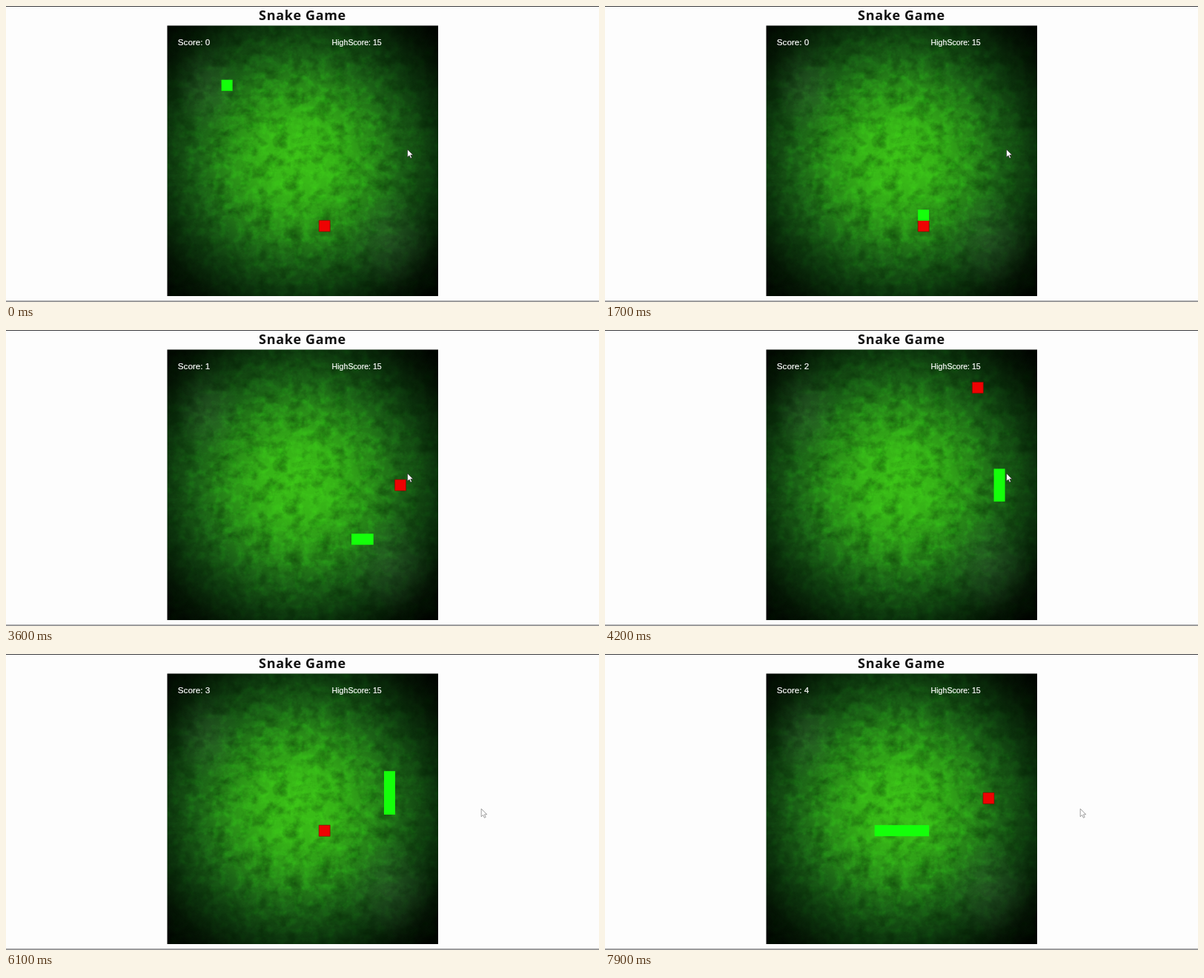
Write an HTML page that moves like this. It is 800 px wide and 400 px high and loops after 8 s.

```html
<!DOCTYPE html>
<html lang="en">
<head>
<meta charset="utf-8">
<title>Snake Game</title>
<style>
  html, body { margin: 0; width: 100%; height: 100%; overflow: hidden; background: #fdfdfd; }
  svg { position: absolute; left: 0; top: 0; width: 800px; height: 400px; }
  #play { will-change: transform; }
  h1 { position: absolute; left: 0; top: 0; width: 800px; margin: 0; text-align: center; color: #111;
       font: bold 18px/24px "Noto Sans", "Open Sans", sans-serif; letter-spacing: .65px; }
  text { font-family: "Liberation Sans", Arial, sans-serif; fill: #fff; stroke: #fff; stroke-width: .2; }
  .grain { mix-blend-mode: overlay; }
</style>
</head>
<body>
<svg viewBox="0 0 800 400">
  <defs>
    <radialGradient id="glow" gradientUnits="userSpaceOnUse" cx="396" cy="206" r="252">
      <stop offset="0" stop-color="#3bc117"/>
      <stop offset=".2" stop-color="#35b217"/>
      <stop offset=".38" stop-color="#298d18"/>
      <stop offset=".55" stop-color="#1a5f16"/>
      <stop offset=".72" stop-color="#0c340d"/>
      <stop offset=".88" stop-color="#031203"/>
      <stop offset="1" stop-color="#000400"/>
    </radialGradient>
    <radialGradient id="haze">
      <stop offset="0" stop-color="#5a7a58" stop-opacity=".22"/>
      <stop offset="1" stop-color="#5a7a58" stop-opacity="0"/>
    </radialGradient>
    <filter id="dark" x="0" y="0" width="1" height="1" color-interpolation-filters="sRGB">
      <feTurbulence type="fractalNoise" baseFrequency=".05 .06" numOctaves="5" seed="4"/>
      <feColorMatrix values="0 0 0 0 0  0 0 0 0 .1  0 0 0 0 0  .9 0 0 0 -.39"/>
    </filter>
    <filter id="light" x="0" y="0" width="1" height="1" color-interpolation-filters="sRGB">
      <feTurbulence type="fractalNoise" baseFrequency=".09" numOctaves="4" seed="9"/>
      <feColorMatrix values="0 0 0 0 .6  0 0 0 0 .8  0 0 0 0 .55  0 1 0 0 -.42"/>
    </filter>
  </defs>
  <path d="M0 .5H800M0 399H800" stroke="#3a3a3d"/>
  <rect x="217.5" y="26.5" width="365.5" height="365.5" fill="url(#glow)"/>
  <ellipse cx="520" cy="318" rx="58" ry="70" fill="url(#haze)"/>
  <ellipse cx="272" cy="110" rx="44" ry="60" fill="url(#haze)"/>
  <rect x="218" y="27" width="365" height="365" filter="url(#dark)"/>
  <rect class="grain" x="218" y="27" width="365" height="365" filter="url(#light)"/>
</svg>
<h1>Snake Game</h1>
<svg id="play" viewBox="0 0 800 400">
  <text id="score" x="231.8" y="52.6" font-size="11.7"></text>
  <text x="439.6" y="52.6" font-size="10.6">HighScore: 15</text>
  <path id="food" fill="#ee0202" stroke="#7a0a04" stroke-width=".6"/>
  <path id="snake" fill="#14ff0a"/>
  <path id="cursor" d="M0 0V10.6L2.5 8.3 4.2 12.1 6 11.3 4.3 7.6H7.6Z" fill="#fff" stroke="#222" stroke-width=".7"/>
</svg>
<script>
const LOOP = 8000, START = 221, STEP = 68, CELL = 14.63;
const foods = [[14, 18], [21, 12], [19, 3], [14, 14], [20, 11]];
const dirs = { R: [1, 0], L: [-1, 0], U: [0, -1], D: [0, 1] };
const $ = id => document.getElementById(id);

// Every cell the head visits, with the score once it is there
const trail = [{ x: 5, y: 5, score: 0 }];
for (const run of 'R9 D16 L8 U4 R15 U6 L6 U8 R5 D14 L12 U3 R6'.split(' ')) {
  const [dx, dy] = dirs[run[0]];
  for (let i = +run.slice(1); i > 0; i--) {
    let { x, y, score } = trail[trail.length - 1];
    x += dx;
    y += dy;
    const [fx, fy] = foods[score];
    if (x === fx && y === fy) score++;
    trail.push({ x, y, score });
  }
}

const cell = (x, y) =>
  `M${(217.4 + x * CELL).toFixed(1)} ${(26.5 + y * CELL).toFixed(1)}h15v15h-15z`;

function draw(t) {
  const n = Math.min(trail.length - 1, Math.max(0, Math.floor((t - START) / STEP)));
  const { score } = trail[n];
  const body = trail.slice(Math.max(0, n - score), n + 1);
  $('snake').setAttribute('d', body.map(p => cell(p.x, p.y)).join(''));
  $('food').setAttribute('d', cell(...foods[score]));
  $('score').textContent = 'Score: ' + score;

  const k = Math.min(1, Math.max(0, (t - 5500) / 400));
  const ease = k * k * (3 - 2 * k);
  $('cursor').setAttribute('transform', `translate(${541.6 + 99.6 * ease} ${193.8 + 15.4 * ease})`);
  $('cursor').setAttribute('stroke', ease > .42 ? '#777' : '#222');
}

const begin = performance.now();
function tick() {
  draw((performance.now() - begin) % LOOP);
  requestAnimationFrame(tick);
}
tick();
</script>
</body>
</html>
```
